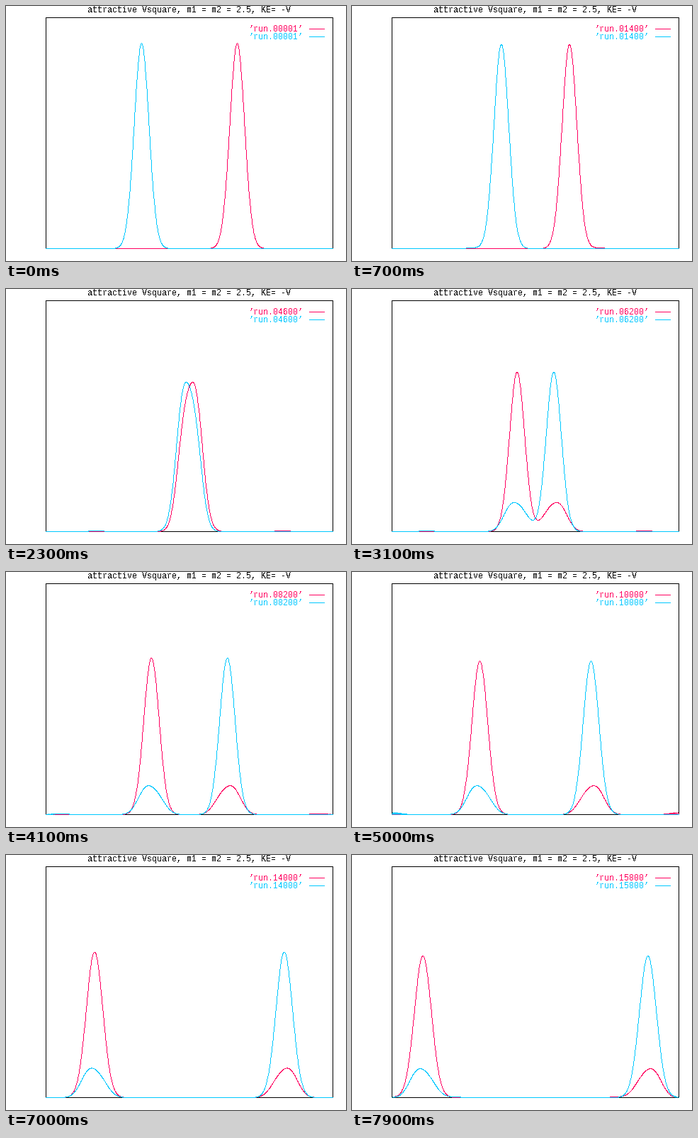
Recreate the animation shown at these times as a matplotlib script. Size 480 by 360 pixels, loop 8000 ms.

```python
import numpy as np
import matplotlib.pyplot as plt
from matplotlib.animation import FuncAnimation
from matplotlib.patches import Polygon, Rectangle

plt.rcParams["text.antialiased"] = False

RED, BLUE = "#ff0060", "#00c8ff"
W, H = 480, 360
LEFT, RIGHT, TOP, BASE = 56, 461, 16, 342
FRAMES, INTERVAL, STEP = 80, 100, 200

# Packet and well, in pixels measured from the middle of the box
PEAK, SIGMA = 288.8, 10.4
START, SPEED, SPREAD = 67.5, 0.01385, 3.64e-5
WALL = (RIGHT - LEFT) / 2
WELL, BOOST = 8.87, np.sqrt(3)
SHIFT = 2 * WELL * (1 - 1 / BOOST)
PASSED = 0.7985
ECHOES = [(2 * WELL, 0.0979), (SHIFT, 0.0409), (2 * SHIFT - 2 * WELL, 0.0627)]
GHOST = 0.87
FRINGE = 3.25
FAR = 1000.0

# Data points lie closer together than the pixel columns
Q = np.linspace(-WALL, WALL, 1402)
MIRROR = np.copysign(2 * WALL, Q) - Q
COLUMN = np.floor(Q + WALL + 0.5).astype(int)
CROSS = np.flatnonzero(np.diff(COLUMN))
EDGES = np.arange(LEFT, RIGHT + 2)
Z = np.linspace(-4, 4, 81)
Z_WEIGHT = np.exp(-Z**2 / 2)
Z_WEIGHT /= Z_WEIGHT.sum()


def width(n):
    return SIGMA * np.hypot(1, SPREAD * n)


def transmit(u):
    """Path through the well: faster inside, ahead of free flight after."""
    return np.interp(u, [-FAR, WELL - 2 * WELL / BOOST, WELL, FAR],
                     [-FAR - SHIFT, -WELL, WELL, FAR])


def reflect(u, lead):
    """Path that turns round in the well and leaves on the same side."""
    leave = lead - WELL
    turn = (WELL + leave) / 2
    depth = WELL - BOOST * (WELL - turn)
    return np.interp(u, [-FAR, leave, turn, WELL, FAR],
                     [lead + FAR, WELL, depth, WELL, FAR])


def bundle(x, center, s, path):
    """Density of a packet whose relative motion follows the given path."""
    s /= np.sqrt(2)
    q = path(center + s * Z)
    bell = np.exp(-((x[:, None] - q) / s) ** 2 / 2)
    return PEAK * SIGMA / s * (bell @ Z_WEIGHT)


def packet(x, n):
    s = width(n)
    center = START - SPEED * n
    total = PASSED * bundle(x, center, s, transmit)
    s_echo = min(s, width(8600))
    for lead, weight in ECHOES:
        total += weight * bundle(x, center, s_echo,
                                 lambda u: reflect(u, lead))
    return total


def ghost(x, n):
    """Faint partner that leaves in the opposite direction."""
    away = START + SPEED * n
    return GHOST * np.exp(-((x - away) / width(n)) ** 2 / 2)


def walled(density, n):
    """Density inside the box, with its interference at the hard walls."""
    direct, back = density(Q, n), density(MIRROR, n)
    phase = FRINGE * (WALL - np.abs(Q))
    return direct + back - 2 * np.sqrt(direct * back) * np.cos(phase)


def outline(h):
    """Outline of the pixels that a thin line through the points covers."""
    rows = np.floor(h + 0.5)
    before, after = rows[CROSS], rows[CROSS + 1]
    rise = after - before
    # A segment between two columns is split halfway
    first = before + np.trunc(rise / 2)
    second = after - np.trunc((rise - np.sign(rise)) / 2)
    cols = np.r_[COLUMN, COLUMN[CROSS], COLUMN[CROSS + 1]]
    values = np.r_[rows, first, second]
    low = np.full(len(EDGES) - 1, np.inf)
    high = -low
    np.minimum.at(low, cols, values)
    np.maximum.at(high, cols, values)
    x = np.repeat(EDGES, 2)[1:-1]
    top = np.repeat(BASE - high, 2)
    bottom = np.repeat(BASE + 1 - low, 2)
    return np.column_stack([np.r_[x, x[::-1]], np.r_[top, bottom[::-1]]])


fig = plt.figure(figsize=(W / 100, H / 100), dpi=100, facecolor="white")
ax = fig.add_axes([0, 0, 1, 1])
ax.set_xlim(0, W)
ax.set_ylim(H, 0)
ax.axis("off")


def bar(x, y, w, h, color):
    ax.add_patch(Rectangle((x, y), w, h, fc=color, lw=0, antialiased=False))


def label(x, y, text, color):
    return ax.text(x, y, text, color=color, family="Liberation Mono",
                   size=8.4, va="baseline", ha="left")


def curve(color):
    patch = Polygon(outline(np.zeros(len(Q))), closed=True, fc=color,
                    ec="none", lw=0, antialiased=False, snap=False)
    return ax.add_patch(patch)


for y in (TOP, BASE):
    bar(LEFT, y, RIGHT - LEFT + 1, 1, "black")
for x in (LEFT, RIGHT):
    bar(x, TOP, 1, BASE - TOP + 1, "black")

label(115, 9, "attractive Vsquare, m1 = m2 = 2.5, KE= -V", "black")
keys = [label(343, 36, "", RED), label(343, 47, "", BLUE)]
bar(428, 32, 22, 1, RED)
bar(428, 43, 22, 1, BLUE)
red, blue = curve(RED), curve(BLUE)


def update(i):
    n = max(1, STEP * i)
    h = walled(packet, n) + walled(ghost, n)
    red.set_xy(outline(h))
    blue.set_xy(outline(h[::-1]))
    for key in keys:
        key.set_text(f"’run.{n:05d}’")
    return red, blue, *keys


anim = FuncAnimation(fig, update, frames=FRAMES, interval=INTERVAL,
                     repeat=True, repeat_delay=0)
plt.show()
```
